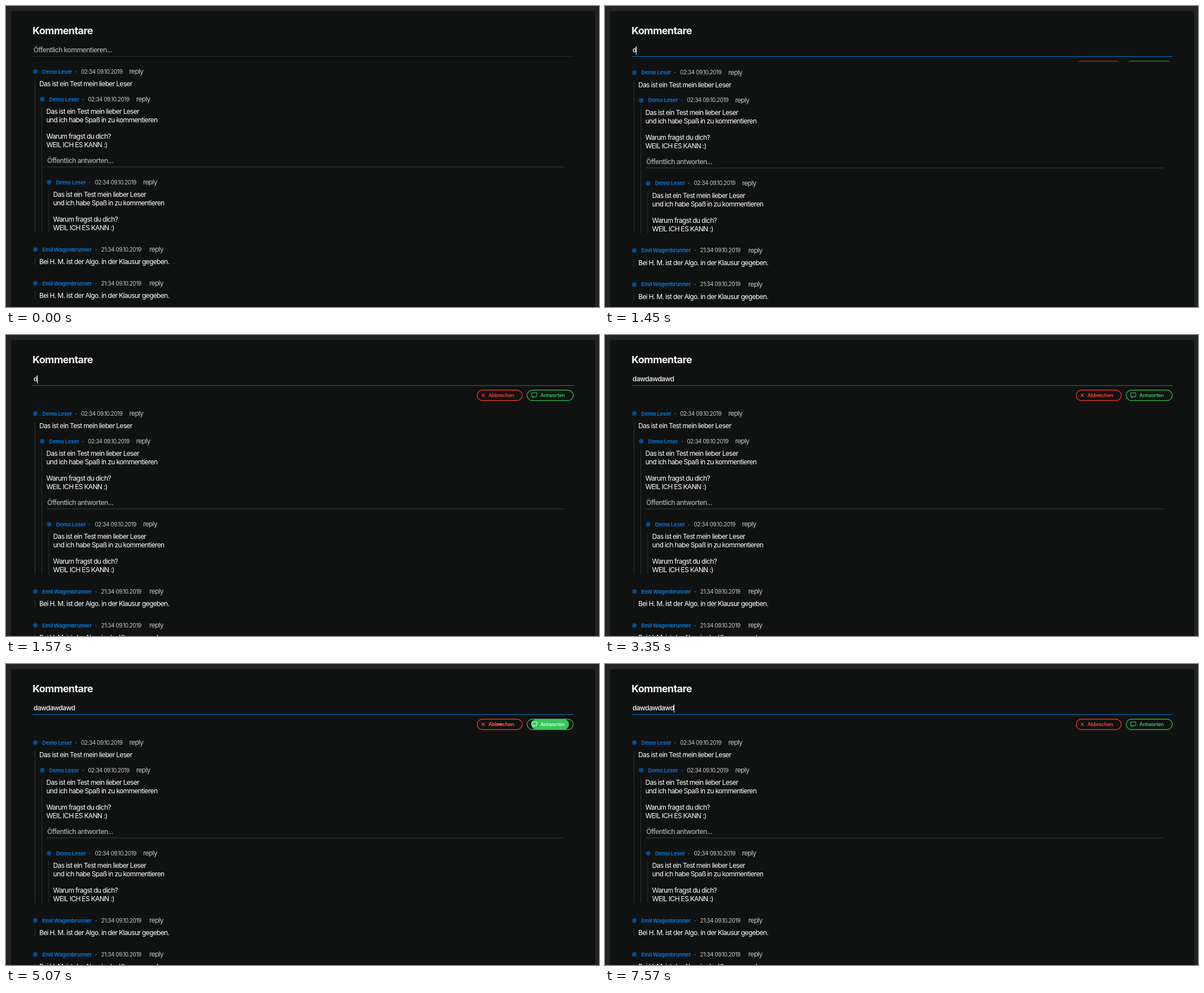
These frames come from a looping animation (1051x533 px, 8 s). An HTML page:

```html
<!DOCTYPE html>
<html lang="de">
<head>
<meta charset="utf-8">
<title>Kommentare</title>
<style>
  html, body { margin: 0; width: 100%; height: 100%; overflow: hidden; background: #222323; }
  svg { display: block; width: 1051px; height: 533px; font-family: Inter, "Open Sans", sans-serif; }
  text { white-space: pre; }
  .title { font-size: 18px; font-weight: 700; letter-spacing: -.6px; fill: #f4f4f4; }
  .hint { font-size: 12px; font-weight: 500; letter-spacing: -.5px; fill: #acacac; }
  .input { font-size: 12px; font-weight: 500; letter-spacing: -.58px; fill: #f4f4f4; }
  .body { font-size: 12px; letter-spacing: -.66px; fill: #fff; }
  .name { font-size: 9.5px; font-weight: 700; letter-spacing: -.22px; fill: #0a70d0; }
  .date { font-size: 10px; letter-spacing: -.45px; fill: #c8c8c8; }
  .reply { font-size: 12px; letter-spacing: -.7px; fill: #c4c4c4; }
  .at { font-size: 7px; font-weight: 600; text-anchor: middle; fill: #0a78e0; }
  .label { font-size: 9px; font-weight: 600; letter-spacing: -.3px; }
  .rail { fill: #303131; }
</style>
</head>
<body>
<svg id="stage" viewBox="0 0 1051 533" xmlns="http://www.w3.org/2000/svg"></svg>
<script>
const LOOP = 8000, OPEN = 23, LINE = 14.67;
const RED = [255, 59, 48], GREEN = [52, 199, 89];

const text = (cls, x, y, s) => `<text class="${cls}" x="${x}" y="${y}">${s}</text>`;
const rail = (x, y, h) => `<rect class="rail" x="${x}" y="${y}" width="1" height="${h}"/>`;
const rgb = c => `rgb(${c.map(Math.round)})`;

// y is the middle of the header row
function head(x, y, name, date, gap) {
  return `<circle cx="${x + 5}" cy="${y}" r="4.8" fill="#06264a"/>` +
    text("at", x + 5, y + 2.3, "@") +
    text("name", x + 17.3, y + 3.5, name) +
    text("date", x + gap - 10.3, y + 3.5, "·") +
    text("date", x + gap, y + 3.6, date) +
    text("reply", x + gap + 85.5, y + 4, "reply");
}

function lines(x, y, list) {
  return list.map((s, i) => s && text("body", x, y + i * LINE, s)).join("");
}

function thread() {
  const first = "Das ist ein Test mein lieber Leser";
  const long = [first, "und ich habe Spaß in zu kommentieren", "", "Warum fragst du dich?", "WEIL ICH ES KANN :)"];
  const who = "Demo Leser", when = "02:34 09.10.2019";
  let out = head(47, 116, who, when, 86) + lines(59, 142.2, [first]) +
    head(59.2, 165, who, when, 86) + lines(71.4, 191.2, long) +
    text("hint", 73, 277.8, "Öffentlich antworten...") +
    `<rect x="72" y="284.4" width="918" height="1" fill="#3b3c3c"/>` +
    head(71.4, 312, who, when, 86) + lines(83.6, 338, long) +
    rail(51, 131, 269) + rail(63, 179, 221) + rail(75.3, 326, 74);
  for (const y of [431, 491])
    out += head(47, y, "Emil Wagenbrunner", "21:34 09.10.2019", 121.5) + rail(51, y + 14, 15) +
      lines(59, y + 26.2, ["Bei H. M. ist der Algo. in der Klausur gegeben."]);
  return out;
}

function button(id, x, w, textX, label, icon) {
  return `<clipPath id="${id}Clip"><rect x="${x}" y="97" width="${w}" height="19.4" rx="9.7"/></clipPath>
    <g clip-path="url(#${id}Clip)"><rect id="${id}Fill"/></g>
    <rect id="${id}Edge" x="${x + .1}" y="97.6" width="${w - .2}" height="18.5" rx="9.25" fill="none" stroke-width="1.2"/>
    <path id="${id}Icon" d="${icon}" fill="none" stroke-width="1.1"/>
    <text id="${id}Label" class="label" x="${textX}" y="110.1">${label}</text>`;
}

const stage = document.getElementById("stage");
stage.innerHTML = `
  <defs><clipPath id="reveal"><rect id="revealBox" x="830" y="96.8" width="180" height="0"/></clipPath></defs>
  <rect width="1051" height="533" fill="#222323"/>
  <rect x="9" y="9" width="1035" height="540" rx="4" fill="#101211"/>
  ${text("title", 47, 49.6, "Kommentare")}
  <text id="hint" class="hint" x="48.8" y="82.4">Öffentlich kommentieren...</text>
  <text id="typed" class="input" x="48.8" y="82.4"></text>
  <rect id="caret" y="71" width="1" height="15" fill="#e8e8e8"/>
  <rect x="47" y="89" width="959" height="1" fill="#2a2b2b"/>
  <rect id="underline" y="89" height="1" fill="#0a6cc6"/>
  <g id="actions" clip-path="url(#reveal)">
    ${button("cancel", 835, 80, 855, "Abbrechen", "M843.2 104.2l5.4 5.4m0 -5.4l-5.4 5.4")}
    ${button("send", 923.5, 82, 947, "Antworten", "M932.6 102.5h7.4q.8 0 .8 .8v5q0 .8 -.8 .8h-3.4l-2.4 2v-2h-1.6q-.8 0 -.8 -.8v-5q0 -.8 .8 -.8z")}
  </g>
  <g id="thread">${thread()}</g>`;

const el = {};
stage.querySelectorAll("[id]").forEach(n => el[n.id] = n);
const set = (id, attrs) => { for (const k in attrs) el[id].setAttribute(k, attrs[k]); };

const clamp = v => Math.max(0, Math.min(1, v));

// CSS "ease": cubic-bezier(.25, .1, .25, 1)
function ease(x) {
  if (x <= 0) return 0;
  if (x >= 1) return 1;
  const curve = (a, b, u) => 3 * a * u * (1 - u) ** 2 + 3 * b * u * u * (1 - u) + u ** 3;
  let lo = 0, hi = 1;
  for (let i = 0; i < 24; i++) {
    const m = (lo + hi) / 2;
    if (curve(.25, .25, m) < x) lo = m; else hi = m;
  }
  return curve(.1, 1, lo);
}

const hover = (t, enter, leave, out = 300) =>
  ease((t - enter) / 300) * (1 - ease((t - leave) / out));

const WORD = "dawdawdawd";
const keys = [[1380, 1], [1620, 3], [1710, 4], [1960, 6], [2010, 7], [2160, 8], [2230, 9], [2300, 10]];
const blinks = [880, 2850, 3390, 3890, 4390, 4980, 5490, 6030, 6520, 7070, 7570];

function paintButton(id, x, w, color, s) {
  const fw = w * s, fh = 23.5 * s;
  set(id + "Fill", {
    x: x + (w - fw) / 2, y: 106.7 - fh / 2, width: fw, height: fh, rx: fh / 2, fill: rgb(color)
  });
  const ink = rgb(color.map(c => c + (255 - c) * s));
  set(id + "Edge", { stroke: rgb(color) });
  set(id + "Icon", { stroke: ink });
  set(id + "Label", { fill: ink });
}

function draw(t) {
  const count = keys.reduce((n, [at, len]) => t >= at ? len : n, 0);
  el.typed.textContent = WORD.slice(0, count);
  set("hint", { visibility: count ? "hidden" : "visible" });

  const on = blinks.filter(b => t >= b).length % 2;
  const end = count ? 48.8 + el.typed.getComputedTextLength() : 48.8;
  set("caret", { x: Math.round(end - .4), visibility: on ? "visible" : "hidden" });

  const span = 959 * ease((t - 490) / 320);
  set("underline", { x: 526.5 - span / 2, width: span });

  const p = (1 - Math.cos(Math.PI * clamp((t - 1425) / 140))) / 2;
  set("revealBox", { height: p * OPEN });
  set("actions", { opacity: Math.min(1, .65 + p), visibility: p ? "visible" : "hidden" });
  set("thread", { transform: `translate(0 ${p * OPEN})` });

  paintButton("cancel", 835, 80, RED, hover(t, 3335, 4340) + hover(t, 5034, 5085, 220));
  paintButton("send", 923.5, 82, GREEN, hover(t, 4364, 5026));
}

function tick() {
  draw(performance.now() % LOOP);
  requestAnimationFrame(tick);
}
tick();
</script>
</body>
</html>
```
